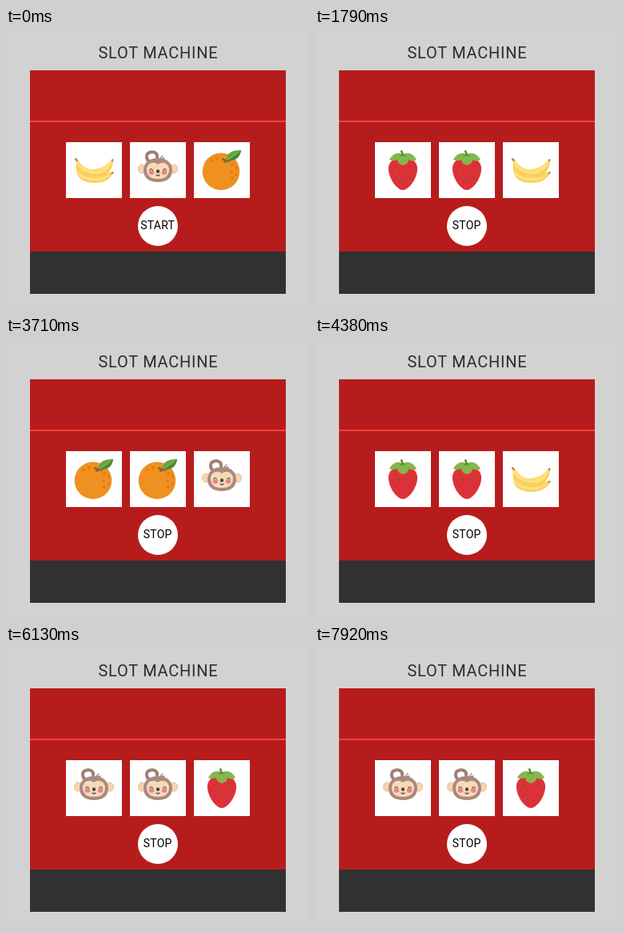
An HTML page for the animation above (8 s loop, 379 by 352 pixels).

```html
<!DOCTYPE html>
<html lang="en">
<head>
<meta charset="utf-8">
<title>Slot machine</title>
<style>
  html, body { margin: 0; width: 100%; height: 100%; overflow: hidden; background: #d2d2d2; }
  svg { display: block; }
  text { font-family: Roboto, sans-serif; text-anchor: middle; }
  .line { fill: none; stroke-linecap: round; stroke-linejoin: round; }
</style>
</head>
<body>
<svg width="379" height="352" viewBox="0 0 379 352">
  <defs>
    <g id="banana">
      <path fill="#f9d262" d="M3 14C2 22 3 28 5 32C10 40 18 41 27 41C37 41 45 37 49 29L47 27C40 31 30 31 20 27Z"/>
      <path fill="#ffe082" d="M4 25C10 34 21 36 30 35C38 35 43 32 47 28C43 35 35 38 26 38C15 38 7 34 4 29Z"/>
      <path fill="#ffdc72" d="M2 12L5 11C8 18 14 23 22 24C32 24 41 20 47 12L49 14C48 24 42 32 31 33C18 34 4 28 2 12Z"/>
      <path fill="#fbcd59" d="M3 18C8 26 18 29 28 29C38 28 45 22 49 14C48 25 41 33 30 33C17 33 6 28 3 18Z"/>
      <path fill="#ffe082" d="M4 14C8 22 17 27 26 27C36 27 43 21 48 13C45 24 37 30 28 30C16 30 6 25 4 14Z"/>
      <path class="line" stroke="#b58a55" stroke-width="2.4" d="M2 11L3.500 13M48.300 12.200L48 13.400M48.400 28L47.800 29"/>
    </g>

    <g id="monkey">
      <g fill="#f6d5ab" stroke="#e9bd90">
        <ellipse cx="5" cy="23.500" rx="4.500" ry="5.500"/>
        <ellipse cx="45" cy="23.500" rx="4.500" ry="5.500"/>
      </g>
      <g class="line" stroke="#a17f78">
        <path stroke-width="4" d="M17 16C9 12 9 4 16 2.500C21 1 25 5 24 9"/>
        <path stroke-width="1.400" d="M28 12Q28 9 31 7M29 12Q30 10 33 10"/>
      </g>
      <path fill="#ab8880" d="M25 10C36 10 43 16 43 25C43 35 36 40 25 40S7 35 7 25C7 16 14 10 25 10Z"/>
      <path fill="#f6dab6" d="M25 18C31 13 40 17 39 26C38 33 33 36 25 36S12 33 11 26C10 17 19 13 25 18Z"/>
      <g fill="#e98282">
        <ellipse cx="17" cy="28" rx="3.200" ry="2.800"/>
        <ellipse cx="33" cy="28" rx="3.200" ry="2.800"/>
      </g>
      <path class="line" stroke="#4d454b" stroke-width="1.100" d="M14.500 25Q16.500 22 18.500 25M31.500 25Q33.500 22 35.500 25M23 31Q25 33 27 31"/>
      <ellipse cx="25" cy="26.500" rx="2.100" ry="2.300" fill="#40404c"/>
    </g>

    <g id="strawberry">
      <path fill="#e03038" d="M25 12C36 8 44 15 43 25C42 37 32 50 25 50S8 37 7 25C6 15 14 8 25 12Z"/>
      <path class="line" stroke="#a9443a" stroke-width="2.200" d="M16 19v2.500M34 19v2.500M20 25v2.500M30 25v2.500M12 26v2.500M38 26v2.500M25 32v2.500M16 33v2.500M34 33v2.500M21 39v2.500M30 39v2.500"/>
      <path fill="#83b84e" d="M24 5C19 2 12 4 8 12C12 14 15 13 18 12C18 16 22 18 25 19C29 18 32 16 32 12C36 14 39 14 42 12C38 4 31 2 26 5Z"/>
      <path fill="#568b35" d="M21.500 1L24 0L26 5L29 8L25 7L20 8L23.500 5Z"/>
    </g>

    <g id="orange">
      <circle cx="24" cy="26.800" r="23.300" fill="#ef901f"/>
      <path class="line" stroke="#e2781c" stroke-width="3.600" d="M12 13h0M19 10.500h0M27 14h0M38 18h0M43 22h0M37 28h0M43 31h0M38 35h0"/>
      <path class="line" stroke="#80612e" stroke-width="2" d="M26 11L30 13L34 11M30 13L29 15M30 13L34 14"/>
      <path fill="#67a443" d="M31 13C30 4 37 0 49 0C48 9 42 14 31 13Z"/>
      <path fill="#4f8934" d="M31 13L49 0C48 9 42 14 31 13Z"/>
      <path class="line" stroke="#a5cf79" stroke-width=".8" d="M32 12L46 2.500"/>
    </g>
  </defs>

  <rect width="379" height="352" fill="#d2d2d2"/>
  <text x="190.400" y="38" font-size="20" letter-spacing=".75" fill="#2d2d2d">SLOT MACHINE</text>
  <rect x="30" y="53" width="320" height="227" fill="#b71c1c"/>
  <rect x="30" y="116" width="320" height="2" fill="#f44336"/>
  <rect x="30" y="280" width="320" height="53" fill="#313131"/>
  <path fill="#fff" d="M75 143h70v70h-70zM155 143h70v70h-70zM235 143h70v70h-70z"/>
  <use class="reel" x="85" y="153"/>
  <use class="reel" x="165" y="153"/>
  <use class="reel" x="245" y="153"/>
  <circle cx="190" cy="248" r="25" fill="#fff"/>
  <text id="label" x="189.700" y="252" font-size="14" letter-spacing=".2" fill="#000">START</text>
</svg>

<script>
  const LOOP = 8000, FPS = 24;
  const CLICK = 495;                        // the button is pressed
  const TICK = 49.99, FIRST_TICK = 517.9;   // the reels advance on a timer
  const ORDER = ['monkey', 'strawberry', 'banana', 'orange'];
  const IDLE = ['banana', 'monkey', 'orange'];
  const reels = [...document.querySelectorAll('.reel')];
  const label = document.getElementById('label');

  function symbolsAt(time) {
    const step = Math.floor((time - FIRST_TICK) / TICK);
    if (step < 0) return IDLE;
    return [0, 0, 1].map(offset => ORDER[(step + offset) % ORDER.length]);
  }

  function draw() {
    const now = performance.now() % LOOP;
    // The picture is held between camera samples; 3 ms absorbs timing round-off.
    const time = Math.floor((now + 3) * FPS / 1000) * 1000 / FPS;
    symbolsAt(time).forEach((name, i) => reels[i].setAttribute('href', '#' + name));
    label.textContent = time < CLICK ? 'START' : 'STOP';
    requestAnimationFrame(draw);
  }
  draw();
</script>
</body>
</html>
```
